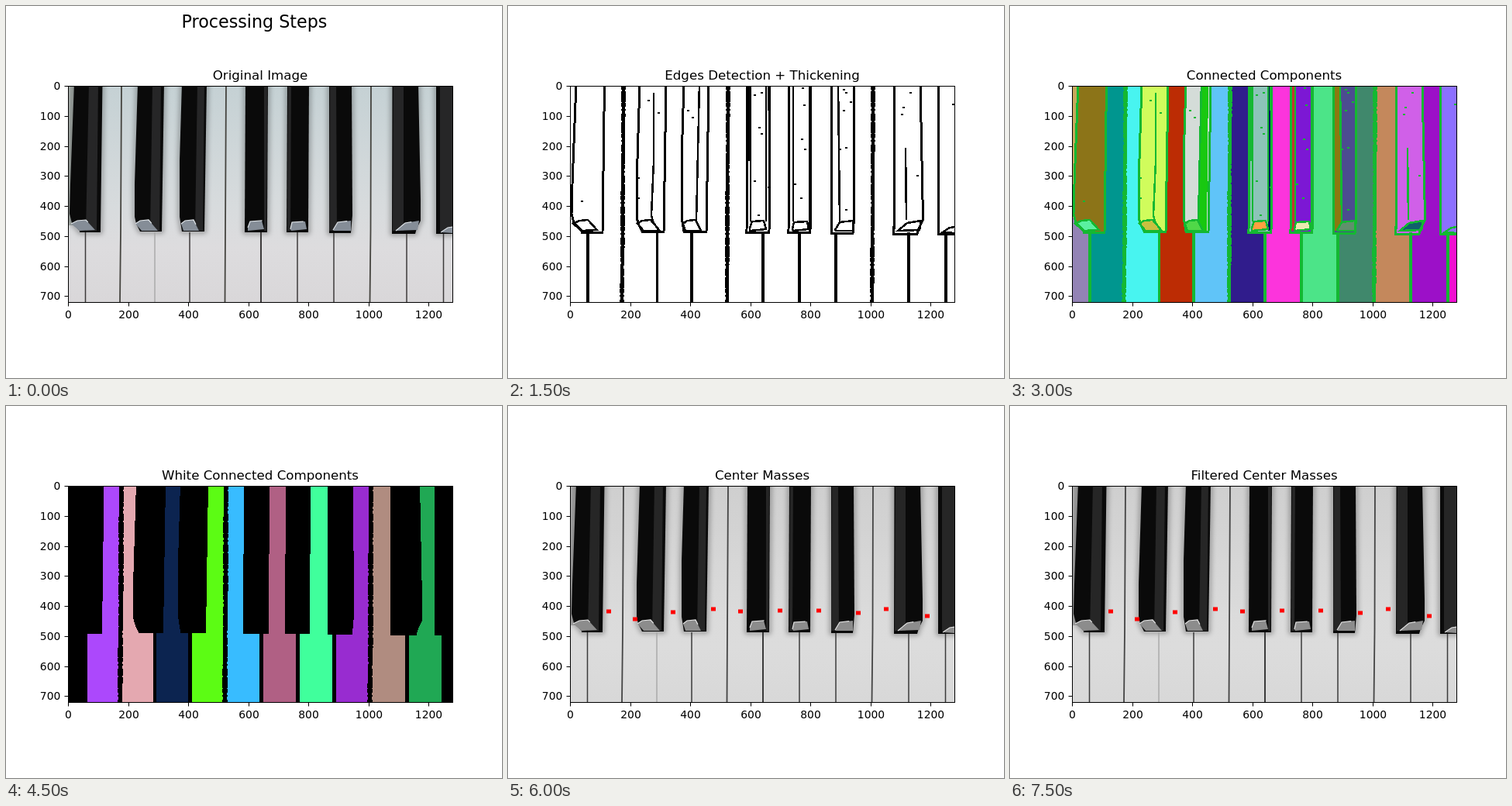
An HTML page that plays this animation: 640x480 px, repeating every 8000 ms.

```html
<!DOCTYPE html>
<html lang="en">
<head>
<meta charset="utf-8">
<title>Processing Steps</title>
<style>
  html, body { margin: 0; width: 100%; height: 100%; overflow: hidden; background: #fff; }
  svg { display: block; }
  text { font-family: "DejaVu Sans", sans-serif; font-size: 13.89px; }
  .title { font-size: 16.67px; text-anchor: middle; }
  .heading { font-size: 22.22px; }
  .mask { shape-rendering: crispEdges; }
  .gray { filter: grayscale(1); }
</style>
</head>
<body>
<svg id="stage" width="640" height="480" viewBox="0 0 640 480"></svg>
<script>
const STEP = 1500, LOOP = 8000;
const LEFT = 80, TOP = 103, WIDTH = 496, HEIGHT = 279, SCALE = WIDTH / 1280;

// Boundaries between white keys, left to right
const bounds = [80, 102.5, 148, 192, 237, 283.5, 329, 376, 423, 470.5, 517, 564.5, 577];
const gaps = [102.5, 192, 237, 329, 376, 423, 517, 564.5];
const seams = ['M149 99L148 290 147 382', 'M284 99L283 290 282.5 382', 'M471 99L470.5 290 469.5 382'];

// Black keys; side holds the x range of the slanted flank at its top and bottom
const blackKeys = [
  { outline: 'M88 99L83 230 82 268 85 280 95 290V292H122L124.5 99Z', side: [107, 119, 103, 117],
    cap: 'M84 281L92 277 103 276 115 289 95 290Z', inner: '',
    colors: ['#8c7418', '#8c7418', '#5af0a0'] },
  { outline: 'M170 99L166 230V272L168 281 173 291H201L204 99Z', side: [189, 200, 186, 198],
    cap: 'M167 281L173 277 184 276 196 290 175 290Z', inner: 'M188 112V200L185 270 187 278 195 290',
    colors: ['#d0fc5c', '#d0fc5c', '#c8c040'] },
  { outline: 'M227 99L224 200V272L227 291H256L259 99Z', side: [247, 256, 244, 254],
    cap: 'M226 281L231 277 242 276 249 290 229 290Z', inner: 'M247 99L243 278',
    colors: ['#d4dcd8', '#18c810', '#50d848'] },
  { outline: 'M309 99L308 292H337L338 99Z', side: [333, 337, 333, 336],
    cap: 'M312 286L315 278 330 277 333 288 312 290Z', inner: 'M313 99V278M333 99V278M336 99V135M311 99V200',
    colors: ['#8cc4b8', '#001464', '#ffa040'] },
  { outline: 'M363 99L362 292H390L391 99Z', side: [364, 368, 363, 367],
    cap: 'M367 288L369 279 386 278 388 288 368 290Z', inner: 'M368 99V278M389 99V290',
    colors: ['#7c18d4', '#c83030', '#ece8b0'] },
  { outline: 'M417 99V293H445L447 270 446 99Z', side: [418, 426, 417, 427],
    cap: 'M422 289L428 279 445 277V290H423Z', inner: 'M426 99L428 278',
    colors: ['#4c4c90', '#8c7810', '#60906c'] },
  { outline: 'M498.5 99L498 294H528L530 287 535 277V250L532 99Z', side: [500, 513, 499, 513],
    cap: 'M503 290L515 280 533 277 531 289Z', inner: 'M513 183L514 276',
    colors: ['#d060e8', '#d060e8', '#10606c'] },
  { outline: 'M555 99V294H580V99Z', side: [560, 580, 560, 580],
    cap: 'M561 292L570 286 577 285V293Z', inner: '',
    colors: ['#8c70ff', '#8c70ff', '#8c70ff'] },
];

const specks = '181,122 194,138 232,135 238,144 168,222 168,248 95,252 318,115 327,112 324,157 ' +
  '327,165 380,106 382,128 379,172 383,185 433,108 436,112 433,135 442,124 428,185 436,183 519,112 ' +
  '510,131 508,140 528,219 574,127 370,230 378,248 436,263 323,270 318,226 336,234';
const centers = '130,265 164,275 213,266 265,262 300,265 351,264 401,264 452,267 488,262 541,271';

const componentColors = ['#9383b5', '#00968f', '#48f4f0', '#bc2c04', '#60c4f8', '#301c8c',
  '#fc34dc', '#4ce488', '#40886c', '#c4885c', '#9c10c8', '#f010d0'];
const whiteKeyColors = ['#000', '#ac48fc', '#e4a8b0', '#0c2450', '#5cfc14', '#38bcff',
  '#b06084', '#40ff9c', '#982cd0', '#b08c80', '#20a854', '#000'];

const rect = (x, y, w, h, fill) => `<rect x="${x}" y="${y}" width="${w}" height="${h}" fill="${fill}"/>`;
const shape = (d, fill) => `<path d="${d}" fill="${fill}"/>`;
const line = (d, color, width, extra = '') =>
  `<path d="${d}" fill="none" stroke="${color}" stroke-width="${width}" ${extra}/>`;
const label = (x, y, text, attrs) => `<text x="${x}" y="${y}" ${attrs}>${text}</text>`;
const squares = (points, w, h, fill) => points.split(' ').map(point => {
  const [x, y] = point.split(',');
  return rect(x - w / 2, y - h / 2, w, h, fill);
}).join('');
const flank = ([a, b, c, d]) => `M${a} 99H${b}L${d} 290H${c}Z`;
const lower = x => `M${x} 292V383`;
const forKeys = draw => blackKeys.map(draw).join('');
const columns = colors => colors.map((color, i) =>
  rect(bounds[i], TOP, bounds[i + 1] - bounds[i], HEIGHT, color)).join('');

function separators(color, width) {
  return seams.map(d => line(d, color, width) +
    line(d, color, width + 1.5, 'stroke-dasharray="9 2 14 1 5 3 2 4"')).join('') +
    gaps.map(x => line(lower(x), color, x === 192 ? width - 1 : width)).join('');
}

function edges(color) {
  return separators(color, 4) + squares(specks, 3, 2, color) + forKeys(key =>
    line(key.outline, color, 3) + line(key.inner, color, 2.5) + line(key.cap, color, 2.5));
}

function photo() {
  return rect(LEFT, TOP, WIDTH, HEIGHT, 'url(#ivory)') +
    rect(LEFT, TOP, 8, 180, '#a9b0ac') +
    forKeys(key => line(key.outline, '#0006', 4, 'style="filter:blur(3px)"')) +
    seams.map(d => line(d, '#45443f', 1.8)).join('') +
    gaps.map(x => line(lower(x), x === 192 ? '#aaa' : '#3c3a3a', x === 329 ? 2 : 1.5)).join('') +
    forKeys(({ outline, side, cap }) =>
      shape(outline, '#0a0a0a') + shape(flank(side), '#262627') +
      shape(cap, '#858d97') + line(cap, '#dfe4e8', 1.2, 'stroke-dasharray="24 200"'));
}

function components() {
  return columns(componentColors) + rect(LEFT, TOP, 10, 170, '#c8a85c') +
    forKeys(({ outline, side, cap, colors }) =>
      shape(outline, colors[0]) + shape(flank(side), colors[1]) + shape(cap, colors[2])) +
    edges('#14b832');
}

function whiteComponents() {
  return columns(whiteKeyColors) + separators('#000', 5) +
    forKeys(key => shape(key.outline, '#000') + line(key.outline, '#000', 4));
}

function axes() {
  let out = `<rect x="80.5" y="103.5" width="${WIDTH}" height="${HEIGHT}" fill="none" stroke="#000"/>`;
  for (let v = 0; v <= 1200; v += 200) {
    const x = Math.round(LEFT + (v + 0.5) * SCALE) + 0.5;
    out += line(`M${x} 383v4.5`, '#000', 1) + label(x, 403, v, 'text-anchor="middle"');
  }
  for (let v = 0; v <= 700; v += 100) {
    const y = Math.round(TOP - 0.1 + (v + 0.5) * SCALE) + 0.5;
    out += line(`M80 ${y}h-4.5`, '#000', 1) + label(70.3, y + 4.5, v, 'text-anchor="end"');
  }
  return out;
}

const view = (content, kind = '') =>
  `<svg x="${LEFT}" y="${TOP}" width="${WIDTH}" height="${HEIGHT}" ` +
  `viewBox="${LEFT} ${TOP} ${WIDTH} ${HEIGHT}"><g class="${kind}">${content}</g></svg>`;
const marked = view(photo(), 'gray') + squares(centers, 6, 5, '#f00');

const scenes = [
  ['Original Image', view(photo()) + label(320.5, 28, 'Processing Steps', 'class="title heading"')],
  ['Edges Detection + Thickening', view(edges('#000'), 'mask')],
  ['Connected Components', view(components(), 'mask')],
  ['White Connected Components', view(whiteComponents(), 'mask')],
  ['Center Masses', marked],
  ['Filtered Center Masses', marked],
];

const stage = document.getElementById('stage');
stage.innerHTML = `<defs><linearGradient id="ivory" x2="0" y2="1">
    <stop stop-color="#c5d1d4"/><stop offset=".55" stop-color="#d7dbdd"/>
    <stop offset=".75" stop-color="#dddcde"/><stop offset="1" stop-color="#d9d7d9"/>
  </linearGradient></defs>` +
  scenes.map(([title, content]) =>
    `<g class="scene">${content}${label(328, 95, title, 'class="title"')}</g>`).join('') + axes();

const groups = stage.querySelectorAll('.scene');
const start = performance.now();

function render() {
  const current = Math.floor((performance.now() - start) % LOOP / STEP);
  groups.forEach((group, i) => group.style.display = i === current ? '' : 'none');
  requestAnimationFrame(render);
}
render();
</script>
</body>
</html>
```
